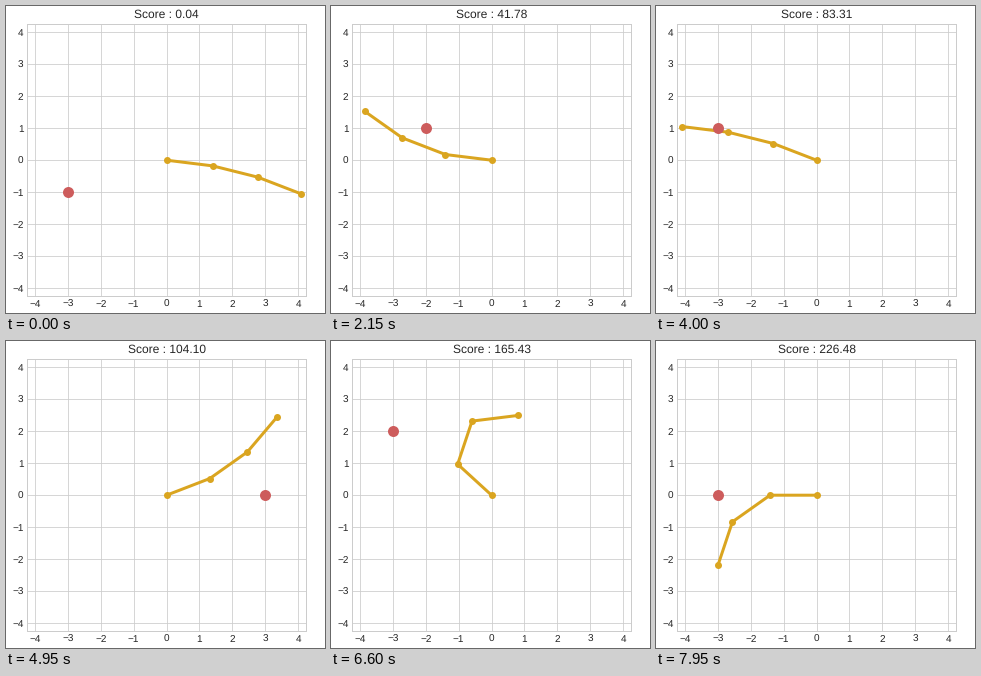
A matplotlib script that plays this animation: 319x307 px, repeating every 8 s.

```python
import numpy as np
import matplotlib.pyplot as plt
from matplotlib.animation import FuncAnimation

W, H, DPI = 319, 307, 72
FRAMES, INTERVAL = 160, 50
LINK = np.sqrt(2)
REACH = 3 * LINK
TURN = 2 * np.pi / 50  # one joint step

# Key poses: frame, shoulder steps, bend steps, whether a target is caught
POSES = [
    (0, -1, -1, False), (14, -15, -7, True), (31, -14, 10, True),
    (51, -18, -10, True), (68, -16, 7, True), (80, -28, 1, False),
    (86, -34, 7, True), (109, -43, -8, True), (114, -38, -13, True),
    (121, -42, -20, True), (137, -26, -4, True), (151, -22, 10, True),
    (156, -22, 7, False), (159, -25, 5, True), (167, -33, 8, True),
]
# Score collected besides the 20 points for each catch
BONUS_FRAMES = [0, 21, 43, 80, 119, 144, 159]
BONUS = [0.04, 0.88, 1.78, 3.31, 4.93, 5.89, 6.48]

plt.rcParams.update({
    "font.family": "Liberation Sans", "font.size": 10,
    "text.hinting": "no_hinting",
    "text.color": "0.15", "xtick.color": "0.15", "ytick.color": "0.15",
    "axes.edgecolor": "0.8", "axes.linewidth": 1, "axes.axisbelow": True,
    "grid.color": "0.8", "grid.linewidth": 0.8, "toolbar": "None",
})

fig = plt.figure(figsize=((W + 0.01) / DPI, (H + 0.01) / DPI), dpi=DPI,
                 facecolor="white")
ax = fig.add_axes([21.06 / W, 16.9 / H, 279 / W, 271.8 / H])
ax.set(xlim=(-REACH, REACH), ylim=(-REACH, REACH),
       xticks=range(-4, 5), yticks=range(-4, 5))
ax.tick_params(length=0, pad=3.5, labelsize=10)
ax.grid(True)

arm, = ax.plot([], [], "o-", color="goldenrod", lw=3, ms=7, mew=0,
               solid_capstyle="round")
target, = ax.plot([], [], "o", color="indianred", ms=11, mew=0, zorder=2.2)
title = ax.set_title("", fontsize=12, pad=6)


def swing(start, end, done, left, side):
    """One step per frame: first towards side, then back to end in time."""
    return side * min(side * start + done, side * end + left)


def joints(frame):
    """The bend folds further first while the shoulder turns against it."""
    leg = sum(pose[0] <= frame for pose in POSES) - 1
    t0, shoulder0, bend0, _ = POSES[leg]
    t1, shoulder1, bend1, _ = POSES[leg + 1]
    done, left, side = frame - t0, t1 - frame, np.sign(bend0)
    return (swing(shoulder0, shoulder1, done, left, -side),
            swing(bend0, bend1, done, left, side))


def arm_points(shoulder, bend):
    angles = TURN * (shoulder + bend * np.arange(3))
    xs = np.cumsum(np.r_[0, LINK * np.cos(angles)])
    ys = np.cumsum(np.r_[0, LINK * np.sin(angles)])
    return xs, ys


def grid_spot(shoulder, bend):
    xs, ys = arm_points(shoulder, bend)
    return round(xs[-1]), round(ys[-1])


CATCHES = [(t, grid_spot(a, b)) for t, a, b, caught in POSES if caught]


def draw(frame):
    arm.set_data(*arm_points(*joints(frame)))
    hits = sum(t <= frame for t, _ in CATCHES)
    x, y = CATCHES[hits][1]
    target.set_data([x], [y])
    score = 20 * hits + np.interp(frame, BONUS_FRAMES, BONUS)
    title.set_text(f"Score : {score:.2f}")
    return arm, target, title


anim = FuncAnimation(fig, draw, frames=FRAMES, interval=INTERVAL,
                     init_func=lambda: draw(0), repeat=True, repeat_delay=0)
plt.show()
```
